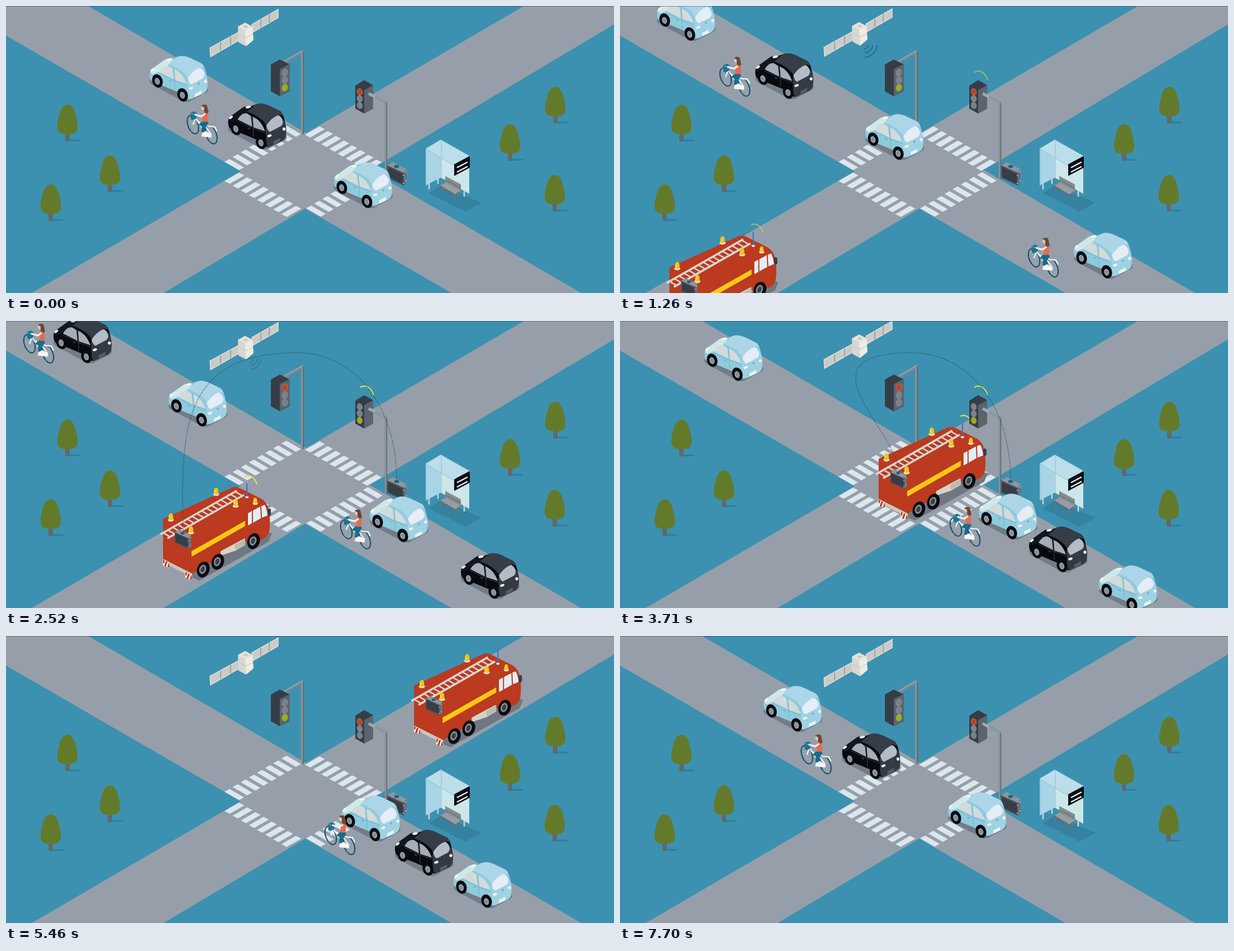
These frames come from a looping animation (1088x515 px, 7770 ms). An HTML page:

```html
<!DOCTYPE html>
<html lang="en">
<head>
<meta charset="utf-8">
<title>Crossing with priority signal</title>
<style>
html, body { margin: 0; width: 100%; height: 100%; overflow: hidden; background: #3c91b0; }
svg { display: block; width: 100vw; height: 100vh; }
.blue { --side: #8ecbdd; --roof: #acd6e8; --hood: #cfe9e8; --glass: #d3dadb; --back: #e5edf6; --rear: #9fd2e2; --line: #6fb2c8; --plate: #e6f4f4; --lamp: #e9f5f7; }
.black { --side: #080a10; --roof: #373d47; --hood: #12161d; --glass: #a4adb8; --back: #b3bcc7; --rear: #343a44; --line: #3b424c; --plate: #565e67; --lamp: #eef3f6; }
.lamp { fill: #79828a; }
.lamp.go { fill: #9cb010; }
.lamp.stop { fill: #cf3b1e; }
.signal { fill: none; stroke: #e3de48; stroke-width: 2.2; }
</style>
</head>
<body>
<svg viewBox="0 0 1088 515" preserveAspectRatio="none">
<defs>
  <g id="tree">
    <ellipse cx="10" cy="64" rx="14" ry="1.6" fill="#2f7c9b"/>
    <path d="M-4 48H4V65Q0 67-4 65Z" fill="#60696d"/>
    <path d="M0 0C8 0 13 9 15 20C18 30 20 42 16 48C11 55-11 55-16 48C-20 42-18 30-15 20C-13 9-8 0 0 0Z" fill="#647a2b"/>
  </g>

  <g id="wheel">
    <ellipse rx="9.3" ry="12.2" transform="rotate(-18)" fill="#090b10"/>
    <ellipse cx="-.5" cy=".5" rx="4.4" ry="6.2" transform="rotate(-18)" fill="#a3abb2"/>
    <ellipse cx="-.5" cy=".5" rx="3" ry="4.5" transform="rotate(-18)" fill="#858d95"/>
  </g>

  <g id="car">
    <path d="M1 44L12 36L104 52L106 62Q104 66 98 68L72 82Q66 84 58 80L6 52Q0 48 1 44Z" fill="#737c87"/>
    <path d="M1 33C1 28 4 24 10 20L28 7C32 4 38 5 42 5L50 2C57-1 66 0 74 4L94 14C99 17 101 25 103 35C105 41 105 49 104 58C103 63 100 66 96 68L76 77C70 80 66 77 64 70L6 46C2 44 1 39 1 33Z" fill="var(--side)"/>
    <path d="M2 29C3 24 7 22 10 20L28 7Q34 4 43 6L36 15L22 27L6 33Z" fill="var(--hood)"/>
    <path d="M35 15L50 2C57-1 66 0 74 4L93 13Q97 15 99 22L91 20L70 40C62 27 50 20 35 15Z" fill="var(--roof)"/>
    <path d="M68 44L99 28L103 36Q106 48 104 59Q103 64 96 68L76 77Q70 79 69 70Z" fill="var(--rear)"/>
    <path d="M69 40Q79 25 91 21Q98 25 99 33Q99 38 95 41L76 51Q72 50 69 40Z" fill="var(--back)"/>
    <path d="M18 29Q25 16 35 18L42 23L44 42Z" fill="var(--glass)"/>
    <path d="M45 24Q60 30 67 50L46 43Z" fill="var(--glass)"/>
    <path d="M17 31L44 44L68 53M44 22Q47 42 46 60M23 47Q20 33 11 36" fill="none" stroke="var(--line)" stroke-width="1"/>
    <path d="M36 44l4 2" stroke="var(--line)" stroke-width="2"/>
    <ellipse cx="6" cy="25" rx="4" ry="2" transform="rotate(-38 6 25)" fill="#eef5f7"/>
    <ellipse cx="37" cy="6.5" rx="5" ry="2.2" transform="rotate(-12 37 6.5)" fill="#eef5f7"/>
    <ellipse cx="75" cy="58" rx="4" ry="2.2" transform="rotate(-20 75 58)" fill="var(--lamp)"/>
    <ellipse cx="101" cy="46" rx="2.6" ry="2.8" fill="var(--lamp)"/>
    <path d="M82 68l12-6v6l-12 6z" fill="var(--plate)"/>
    <circle cx="89" cy="50" r="2" fill="var(--line)"/>
    <use href="#wheel" x="15" y="45"/>
    <use href="#wheel" x="60" y="70"/>
  </g>

  <g id="ring" fill="none" stroke="#174e66">
    <ellipse rx="9" ry="17" transform="rotate(-20)" stroke-width="2"/>
    <path d="M-6-15L6 15M-9-2L9 2M4-14L-4 14" stroke="#8fb6c6" stroke-width=".6"/>
  </g>
  <g id="bike">
    <use href="#ring" x="11" y="36"/>
    <use href="#ring" x="44" y="54"/>
    <path d="M11 36L17 20M16 25L32 48L44 54L32 37L18 29M32 37L31 50" fill="none" stroke="#eef3f5" stroke-width="2.2"/>
    <path d="M36 38L50 40L54 48" fill="none" stroke="#eef3f5" stroke-width="2.4"/>
    <path d="M6 15L13 12L19 15L17 25L10 28L7 26Z" fill="#1e7392"/>
    <path d="M6 15L13 18L19 15" fill="none" stroke="#7bb3c6"/>
    <path d="M26 31Q36 27 39 33L34 41L32 51L26 49L27 39L21 36Z" fill="#176c8d"/>
    <path d="M27 51L33 48L44 55L44 59L26 57Z" fill="#f5f7f8"/>
    <path d="M30 14Q37 12 38 17L38 29Q33 32 28 30Z" fill="#e9694a"/>
    <path d="M32 17L26 21L15 18" fill="none" stroke="#f5ece6" stroke-width="3.2" stroke-linecap="round"/>
    <circle cx="30" cy="6" r="4" fill="#efc4ab"/>
    <path d="M26 2Q31-2 36 1Q38 9 39 14Q34 18 31 12L31 5Z" fill="#67493a"/>
  </g>

  <g id="case">
    <path d="M0 6L10 0L35 13V37L30 42L0 28Z" fill="#69727a"/>
    <path d="M0 6L10 0L35 13L30 19Z" fill="#8d969d"/>
    <path d="M0 6L30 20V42L0 28Z" fill="#363d47"/>
    <path d="M1 8L29 21V40L1 27Z" fill="none" stroke="#59626b"/>
    <path d="M34 17v2M34 33v2M29 23v2M29 37v2" stroke="#c5cbd0" stroke-width="1.6"/>
    <ellipse cx="17" cy="8" rx="4.5" ry="2.8" fill="#20627d"/>
  </g>

  <g id="beacon">
    <ellipse cy="5" rx="5.5" ry="3" fill="#e6e0cf"/>
    <path d="M-4 4V-2Q-3-7 0-7Q3-7 4-2V4Q0 6-4 4Z" fill="#ffc20e"/>
    <path d="M-2 2V-2" stroke="#ffe27a" stroke-width="1.5"/>
  </g>
  <g id="tyre">
    <ellipse rx="11" ry="14.5" transform="rotate(20)" fill="#090b0f"/>
    <ellipse cx="-1" rx="6" ry="8.5" transform="rotate(20)" fill="#858d93"/>
    <ellipse cx="-1" rx="3.5" ry="5.5" transform="rotate(20)" fill="#393f46"/>
  </g>
  <g id="board">
    <path d="M0 0L12 5V15L1 11Z" fill="#f2efe8"/>
    <path d="M1 0l3 2l-1 5l-2-1zM6 3l3 1l-3 9l-3-1zM11 6l1 1v7l-3 0z" fill="#bb3a20"/>
  </g>
</defs>

<rect width="1088" height="515" fill="#3c91b0"/>
<path d="M0 0H147L1029 515H797L0 53Z" fill="#969fa9"/>
<path d="M927 0H1088V33L282 515H46Z" fill="#969fa9"/>
<path id="zebra" fill="#dce6ef"/>
<g id="trees"></g>

<!-- bus shelter -->
<path d="M757 336L778 322L851 353L822 369Z" fill="#3481a0"/>
<path d="M757 318v11M773 309v10M820 331v11" stroke="#c8d3da" stroke-width="2.6"/>
<path d="M751 256L778 241V308L751 322Z" fill="#a9d4e6"/>
<path d="M778 241L829 270V337L778 308Z" fill="#cbe7e9"/>
<path d="M751 256L778 240L831 270L803 287Z" fill="#bbdeea" stroke="#8fc0d3"/>
<path d="M779 242V308M752 257V322" stroke="#8fc0d3"/>
<path d="M779 325v9M804 338v9M811 333v8" stroke="#6c7278" stroke-width="2.2"/>
<path d="M786 305L814 320V334L786 319Z" fill="#858b91"/>
<path d="M786 312L814 327" stroke="#666d73" stroke-width="1.4"/>
<path d="M777 322L787 317L813 331L804 338Z" fill="#989da2"/>
<path d="M777 322L804 338V341L777 325Z" fill="#666d73"/>
<path d="M802 284L830 269V290L802 305Z" fill="#0a0e14"/>
<path d="M807 290L826 280M807 298L826 288" stroke="#f4f7f9" stroke-width="2.2"/>

<!-- left signal -->
<path d="M498 101L531 82" stroke="#7d868d" stroke-width="5"/>
<path d="M498 99L531 80" stroke="#9aa3a9" stroke-width="2"/>
<path d="M528 82L533 81V229L530 231L528 229Z" fill="#8b949b"/>
<path d="M531 82L533.5 81V229L531 231Z" fill="#646d74"/>
<path d="M474 105L490 96L508 105V153L490 162L474 153Z" fill="#363d46"/>
<path d="M490 113L508 104V153L490 162Z" fill="#5b646c"/>
<g id="west"></g>

<g id="truck">
  <path d="M322 456L346 466L470 396L476 381L440 372Z" fill="#6f7882"/>
  <path d="M281 355L404 299Q412 296 419 300L457 319Q467 325 470 338Q474 356 471 378Q468 389 455 393L428 396L332 454L281 427Z" fill="#bb3a20"/>
  <path d="M384 413L427 390L428 402L411 412L384 421Z" fill="#d6d4c8"/>
  <path d="M409 402L428 391V402L411 411Z" fill="#bdbbae"/>
  <path d="M281 427L333 453V460L281 433Z" fill="#cbc7ba"/>
  <use href="#board" x="280" y="428"/>
  <use href="#board" x="320" y="450"/>
  <use href="#tyre" x="353" y="446"/>
  <use href="#tyre" x="379" y="432"/>
  <use href="#tyre" x="443" y="395"/>
  <path d="M332 413L428 358.5V368L332 423Z" fill="#ffc814"/>
  <path d="M433 345L440 341V363L433 367ZM442 340L455 333L456 354L442 362ZM457 332L463 330Q467 338 468 349L458 353Z" fill="#e4edf6"/>
  <path d="M468 338Q471 335 474 338V348Q471 351 469 349Z" fill="#363d46"/>
  <g stroke="#d8d5cf">
    <path d="M276 383L413 304.5M289 390L426 312" stroke-width="3.6"/>
    <path id="rungs" stroke-width="2.6"/>
  </g>
  <use href="#beacon" x="376" y="306"/>
  <use href="#beacon" x="411" y="327"/>
  <use href="#beacon" x="295" y="352"/>
  <use href="#beacon" x="331" y="375"/>
  <use href="#beacon" transform="translate(446 323) scale(.85)"/>
  <ellipse cx="431" cy="316" rx="3" ry="2" fill="#e7eef5"/>
  <path d="M431 291V315" stroke="#2f73da" stroke-width="2"/>
  <use href="#case" transform="translate(302 374) scale(.83)"/>
  <path class="signal" d="M427 279C435 274 445 280 449 293"/>
</g>

<!-- right signal -->
<path d="M680 173V310" stroke="#69737a" stroke-width="4.5"/>
<path d="M679 173V310" stroke="#8c969d" stroke-width="2"/>
<path d="M649 157L681 174" stroke="#8c969d" stroke-width="5"/>
<path d="M625 143L641 133L657 142V184L641 193L625 184Z" fill="#363d46"/>
<path d="M641 151L657 142V184L641 193Z" fill="#5b646c"/>
<path d="M649 157L660 163" stroke="#a1aab0" stroke-width="5"/>
<g id="east"></g>
<path class="signal" d="M634 119C643 113 653 119 658 133"/>
<use href="#case" x="682" y="280"/>

<g id="traffic"></g>

<path id="link" fill="none" stroke="#17485d" stroke-width="1.5" stroke-dasharray="1.4 2.4"/>

<g id="sat">
  <path id="waves" d="M7 0A7 7 0 0 1 0 7M15 0A15 15 0 0 1 1 14M23 0A23 23 0 0 1 1 22" fill="none" stroke="#246f90" stroke-width="2.4"/>
  <path d="M365 75L416 47V62L366 91ZM440 33L487 6V21L442 47Z" fill="#cbcbc6" stroke="#e2e1dc" stroke-width="1.4"/>
  <path d="M384 65v15M402 55v15M456 24v15M471 15v15" stroke="#92989a" stroke-width="1.5"/>
  <path d="M415 37L428 30L441 37V62L429 72L416 65Z" fill="#d8d8d2"/>
  <path d="M428 44L441 37L443 61L430 72Z" fill="#edece5"/>
  <path d="M415 37L428 30L441 37L428 44Z" fill="#e3e2dc"/>
  <ellipse cx="429" cy="37" rx="4" ry="2" fill="#c9c8c2"/>
  <path d="M416 50L429 57L442 50" fill="none" stroke="#c2c2bc"/>
</g>
<rect width="1088" height="1" fill="#26485a" opacity=".55"/>
</svg>

<script>
const LOOP = 7770, CYCLE = 7700, STEP = 70;
const $ = id => document.getElementById(id);
const clamp = v => Math.max(0, Math.min(1, v));

function add(parent, tag, attrs) {
  const el = document.createElementNS('http://www.w3.org/2000/svg', tag);
  for (const k in attrs) el.setAttribute(k, attrs[k]);
  return parent.appendChild(el);
}

// Fixed scenery
function stripes(x, y, rise, shape) {
  let d = '';
  for (let i = 0; i < 8; i++) d += `M${x + i * 14.55} ${y + i * rise}${shape}`;
  return d;
}
const down = 'l9-5l26 15l-9 5z', up = 'l26-15l9.5 5l-26 15z';
$('zebra').setAttribute('d', stripes(391, 279.5, -8.55, down) + stripes(537, 363, -8.55, down) +
  stripes(535, 231, 8.5, up) + stripes(391, 314, 8.5, up));

for (const [x, y] of [[110, 177], [186, 268], [80, 320], [983, 145], [902, 212], [982, 303]])
  add($('trees'), 'use', { href: '#tree', x, y });

let rungs = '';
for (let i = 0; i < 16; i++) rungs += `M${281 + i * 8.6} ${380 - i * 4.93}l13 7.5`;
$('rungs').setAttribute('d', rungs);

function lamps(id, x, y, gap, rx, ry, tilt) {
  return [0, 1, 2].map(i => add($(id), 'ellipse', {
    class: 'lamp', rx, ry, stroke: '#8f979d', 'stroke-width': .7,
    transform: `translate(${x} ${y + i * gap}) rotate(${tilt})`
  }));
}
const west = lamps('west', 499, 119.5, 13.5, 5, 6.5, 15);
const east = lamps('east', 633, 154, 12.2, 4.6, 6, -15);

function light(set, go) {
  set[0].setAttribute('class', go ? 'lamp' : 'lamp stop');
  set[2].setAttribute('class', go ? 'lamp go' : 'lamp');
}

// Smooth curve through (time, value) pairs without overshoot
function curve(keys) {
  const T = keys.filter((_, i) => i % 2 < 1), X = keys.filter((_, i) => i % 2);
  const n = T.length, s = [];
  for (let i = 0; i < n - 1; i++) s.push((X[i + 1] - X[i]) / (T[i + 1] - T[i]));
  const m = T.map((_, i) => {
    if (!i) return s[0];
    if (i === n - 1) return s[n - 2];
    const a = s[i - 1], b = s[i];
    return a * b > 0 ? 2 * a * b / (a + b) : 0;
  });
  return t => {
    if (t < T[0] || t > T[n - 1]) return null;
    let i = 0;
    while (i < n - 2 && t > T[i + 1]) i++;
    const h = T[i + 1] - T[i], u = (t - T[i]) / h, v = 1 - u;
    return v * v * (1 + 2 * u) * X[i] + u * u * (3 - 2 * u) * X[i + 1] +
      h * u * v * (v * m[i] - u * m[i + 1]);
  };
}

// Each vehicle crosses the stage over more than one cycle: x keys, then y = y0 + (x - x0) * slope
const fleet = [
  ['car', 'blue', 430, 189, .572, [0, 1012, 1260, 811, 2520, 650, 2870, 641, 5040, 641, 5460, 600, 6650, 430, 7700, 256, 8960, 65, 9760, -55]],
  ['car', 'black', 545, 261, .58, [1260, 1015, 2520, 813, 3150, 734, 3710, 731, 5110, 731, 5460, 695, 6650, 545, 7700, 396.5, 8960, 241, 10220, 84, 11480, -73]],
  ['car', 'blue', 586, 280.5, .585, [2520, 1012, 3430, 895, 3710, 856, 4200, 834, 5110, 834, 5460, 800, 5950, 766, 6650, 683.5, 7700, 586, 8960, 438, 10220, 290, 11410, 150, 13230, -64]],
  ['bike', '', 323.5, 177, .588, [0, 912, 1260, 730, 2520, 598, 2870, 590, 5040, 590, 5460, 570, 6650, 453, 7700, 323.5, 8960, 178, 10220, 31, 11060, -67]]
].map(([shape, tone, x0, y0, slope, keys]) => ({
  x0, y0, slope, at: curve(keys),
  els: [1, 0].map(() => add($('traffic'), 'use', { href: '#' + shape, class: tone }))
}));

function bob(t) {
  const low = 6543;
  const angle = t < low ? t / 1454 * 2 * Math.PI : Math.PI * (1 + (t - low) / (CYCLE - low));
  return 3 * Math.cos(angle) - 3;
}

function draw(t) {
  for (const v of fleet) v.els.forEach((el, i) => {
    const x = v.at(t + (1 - i) * CYCLE);
    el.style.display = x === null ? 'none' : '';
    if (x !== null) el.setAttribute('transform', `translate(${x} ${v.y0 + (x - v.x0) * v.slope})`);
  });

  const dx = .1528 * (t - 2520), dy = -.593 * dx;
  $('truck').setAttribute('transform', `translate(${dx} ${dy})`);

  const priority = t >= 1750 && t < 4900;
  light(west, !priority);
  light(east, priority);

  const beam = clamp((t - 1050) / 420) * clamp((4550 - t) / 210);
  document.querySelectorAll('.signal').forEach(el => el.style.opacity = beam);

  const sx = 317 + dx, sy = 378 + dy;
  $('link').setAttribute('d', `M${sx} ${sy}C${sx - 4} ${Math.min(195, sy - 60)} 313 57 522 57C620 57 699 147 699 286`);
  $('link').style.opacity = clamp((t - 1470) / 280) * clamp((4550 - t) / 210);

  $('sat').setAttribute('transform', `translate(0 ${bob(t)})`);
  const p = t % 1915 / 1915;
  $('waves').setAttribute('transform', `translate(437 71) scale(${clamp(.1 + p / .42)})`);
  $('waves').style.opacity = p ? clamp(.2 + p) * clamp((.8 - p) / .12) : 0;
}

function frame() {
  const t = (performance.now() + 8) % LOOP;
  draw(Math.floor(t / STEP) * STEP);
  requestAnimationFrame(frame);
}
frame();
</script>
</body>
</html>
```
